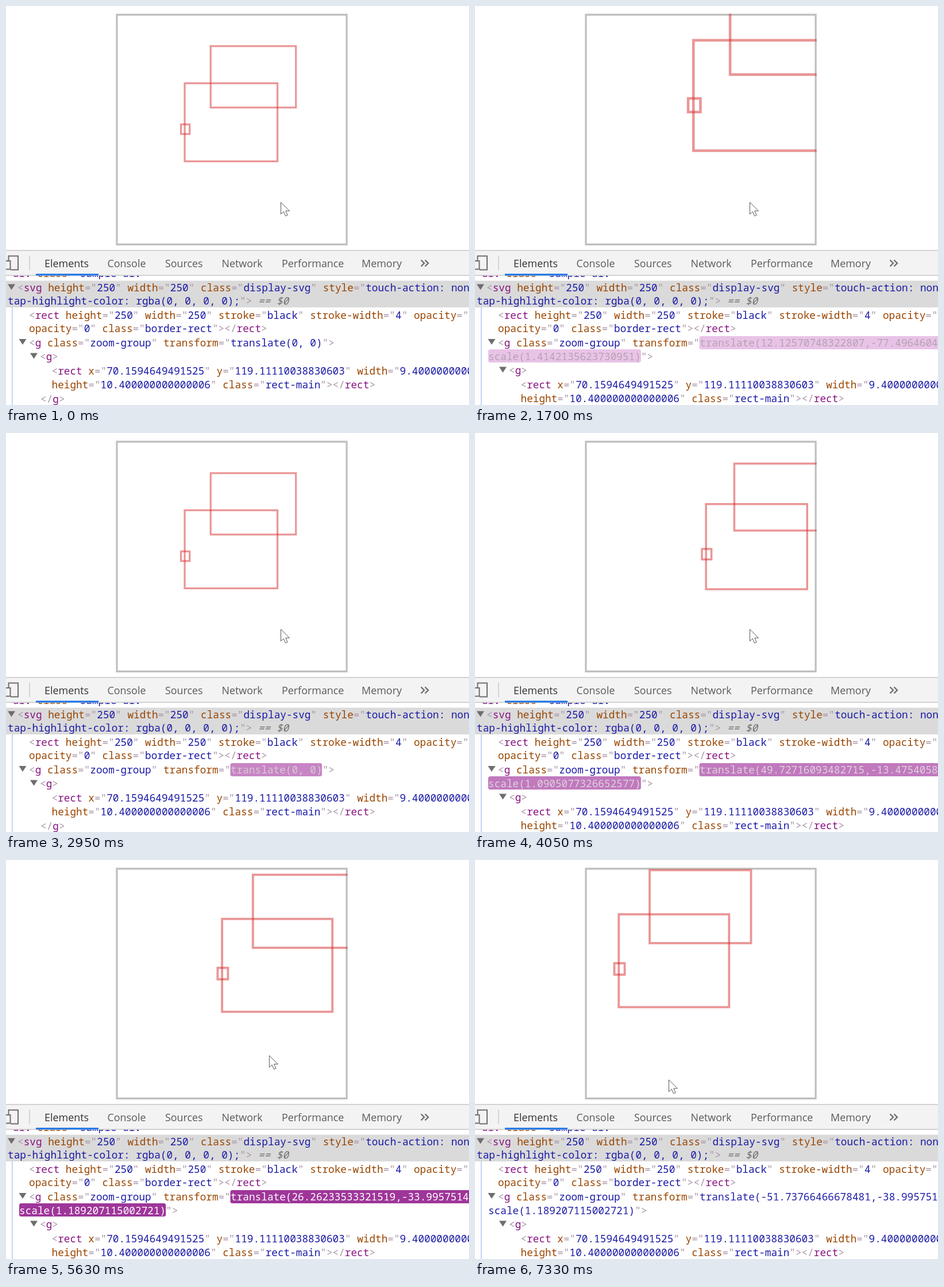
Write an HTML page that moves like this. It is 806x695 px and loops after 7.47 s.

```html
<!DOCTYPE html>
<html lang="en">
<head>
<meta charset="utf-8">
<title>Zoom and pan inspector</title>
<style>
  html, body { margin: 0; width: 100%; height: 100%; overflow: hidden; background: #fff; }
  #stage { display: block; }
  text { white-space: pre; }
  .code { font: 17.73px "Noto Sans Mono", monospace; fill: #a894a6; }
  .tag { fill: #881280; }
  .attr { fill: #994500; }
  .value { fill: #1a1aa6; }
  .note { fill: #6e6e6e; font-style: italic; }
  .tab { font: 17.9px "Open Sans", sans-serif; fill: #5a5a5a; }
  .arrow { fill: #6e6e6e; }
  .shapes rect { fill: none; stroke: rgb(214, 47, 47); stroke-width: 2; opacity: .5; }
</style>
</head>
<body>
<svg id="stage" width="806" height="695" viewBox="0 0 806 695">
  <svg x="191.4" y="13.6" width="403.3" height="403.3" viewBox="0 0 250 250">
    <rect width="250" height="250" fill="none" stroke="#000" stroke-width="4" opacity=".25"/>
    <g id="zoom" class="shapes">
      <rect x="70.16" y="119.4" width="9.4" height="10.4"/>
      <rect x="74.2" y="75" width="100.1" height="84.3"/>
      <rect x="102.2" y="34.9" width="92" height="66.3"/>
    </g>
  </svg>

  <rect y="478.5" width="806" height="46.5" fill="#dadada"/>
  <rect x="10" y="525" width="1.6" height="170" fill="#b4cdf6"/>
  <g id="markup"></g>
  <g id="boxes">
    <rect x="390.5" y="575" height="23" rx="3.5"/>
    <rect x="23" y="598" width="0" height="23" rx="3.5"/>
  </g>
  <g id="values" class="code">
    <text x="391.1" y="593"></text>
    <text x="23" y="616.5"></text>
  </g>
  <g id="closing"></g>
  <g id="children"></g>

  <rect y="425" width="806" height="45" fill="#f3f3f3"/>
  <path d="M0 425.8H806M0 469.3H806" stroke="#c8c8c8" stroke-width="1.5"/>
  <path d="M41 435V460" stroke="#ccc" stroke-width="1.6"/>
  <rect x="52" y="466.4" width="109" height="3" fill="#1a73e8"/>
  <g fill="#f3f3f3" stroke="#6e6e6e" stroke-width="2">
    <path d="M4.5 443V435.5H21V459.5H8"/>
    <rect x="-6" y="444" width="13.5" height="14.5"/>
    <path d="M722.5 442.5l5.5 5.5-5.5 5.5M729.5 442.5l5.5 5.5-5.5 5.5" fill="none" stroke-width="2.4"/>
  </g>
  <g id="tabs"></g>

  <path id="cursor" d="M0 0V20.5L4.7 16.2 8 23.8 11.6 22.2 8.3 14.9H15Z"
        fill="#fff" stroke="#444" stroke-width=".9"/>
</svg>
<script>
const LOOP = 7470, FIRST_TICK = 438, TICK = 156.4, FADE = 1400, CHAR = 10.638;
const $ = id => document.getElementById(id);

// Translate and scale after each wheel notch.
const LEVELS = [
  [0, 0, 1],
  [49.72716093482715, -13.47540582716394, 1.0905077326652577],
  [38.26233533321519, -32.99575148273615, 1.189207115002721],
  [25.75977920418365, -54.28290361748253, 1.296839554651009],
  [12.12570748322807, -77.49646042815937, 1.4142135623730951]
];
// [time, level]
const NOTCHES = [
  [-FADE, 0], [438, 1], [545, 3], [1100, 4],
  [2300, 3], [2460, 2], [2610, 1], [2729, 0],
  [3870, 1], [4227, 2]
];
const PAN = { start: 5480, end: 5993, dx: -90, dy: -6 };

const escape = s => s.replace(/&/g, '&amp;').replace(/</g, '&lt;');
const span = (cls, s) => `<tspan class="${cls}">${escape(s)}</tspan>`;

// Colours one line of markup; quoted tells whether it begins inside a value.
function highlight(src, quoted = false) {
  let afterOpen = false;
  return src.match(/"|<\/?|[=>]|\/|\s+|[^"<>=\/\s]+/g).map(token => {
    if (token === '"') { quoted = !quoted; return token; }
    if (quoted) return span('value', token);
    if (token[0] === '<') { afterOpen = true; return escape(token); }
    if (!/\w/.test(token)) return token;
    const cls = afterOpen ? 'tag' : 'attr';
    afterOpen = false;
    return span(cls, token);
  }).join('');
}
const line = (x, y, src, quoted) =>
  `<text class="code" x="${x}" y="${y}">${highlight(src, quoted)}</text>`;
const arrow = (x, y) => `<path class="arrow" d="M${x} ${y}h13l-6.5 10z"/>`;

$('markup').innerHTML =
  line(1, 471.8, '<div class="sample-div">') +
  arrow(3, 484.5) +
  line(20, 497, '<svg height="250" width="250" class="display-svg" style="touch-action: none;') +
  line(3, 520, 'tap-highlight-color: rgba(0, 0, 0, 0);">', true) +
  `<text class="code note" x="439" y="520">== $0</text>` +
  line(40, 544.5, '<rect height="250" width="250" stroke="black" stroke-width="4" opacity="0.25"') +
  line(40, 568, 'opacity="0" class="border-rect"></rect>') +
  arrow(22.5, 580) +
  line(40, 593, '<g class="zoom-group" transform="');

$('children').innerHTML =
  arrow(42, 604.5) +
  line(59, 617, '<g>') +
  line(79.5, 642, '<rect x="70.1594649491525" y="119.11110038830603" width="9.400000000000006"') +
  line(79.5, 666, 'height="10.400000000000006" class="rect-main"></rect>') +
  line(60, 691, '</g>');

$('tabs').innerHTML = [
  ['Elements', 67], ['Console', 176.5], ['Sources', 277],
  ['Network', 375.5], ['Performance', 480], ['Memory', 619]
].map(([name, x], i) =>
  `<text class="tab" x="${x}" y="454.5"${i ? '' : ' style="fill:#333"'}>${name}</text>`).join('');

// The flash is seeked by hand, so it stays paused.
function flash(el, colours) {
  const easing = 'cubic-bezier(0, 0, .2, 1)';
  const frames = colours.map((fill, i) => ({ fill, offset: [0, .8, 1][i], easing }));
  const anim = el.animate(frames, { duration: FADE, fill: 'both' });
  anim.pause();
  return anim;
}
const flashes = [
  flash($('boxes'), ['rgb(158,54,153)', 'rgb(245,219,244)', 'rgba(245,219,244,0)']),
  flash($('values'), ['rgb(255,255,255)', 'rgb(168,148,166)', 'rgb(26,26,166)'])
];

const progress = (t, a, b) => Math.min(1, Math.max(0, (t - a) / (b - a)));
const smooth = u => u * u * (3 - 2 * u);

function stateAt(t) {
  let [changed, level] = NOTCHES.filter(n => n[0] <= t).pop();
  const pan = smooth(progress(t, PAN.start, PAN.end));
  const leave = smooth(progress(t, 6470, 6860));
  if (pan > 0) changed = Math.min(t, PAN.end);
  const [x, y, scale] = LEVELS[level];
  return {
    x: x + Math.round(PAN.dx * pan),
    y: y + Math.round(PAN.dy * pan),
    scale,
    age: Math.min(FADE, t - changed),
    cursor: [478.5 - 147 * pan + 6 * leave, 342 - 10 * pan + 51 * leave]
  };
}

function draw(t) {
  const { x, y, scale, age, cursor } = stateAt(t);
  const wrapped = scale !== 1;
  const first = wrapped ? `translate(${x},${y})` : 'translate(0, 0)';
  const second = wrapped ? `scale(${scale})` : '';
  const [box1, box2] = $('boxes').children;
  const [text1, text2] = $('values').children;

  $('zoom').setAttribute('transform', `translate(${x},${y}) scale(${scale})`);
  $('cursor').setAttribute('transform', `translate(${cursor})`);
  $('children').setAttribute('transform', `translate(0,${wrapped ? 24 : 0})`);
  text1.textContent = first;
  text2.textContent = second;
  box1.setAttribute('width', first.length * CHAR);
  box2.setAttribute('width', second.length * CHAR);
  $('closing').innerHTML = wrapped
    ? line(23 + second.length * CHAR, 616.5, '">', true)
    : line(391.1 + first.length * CHAR, 593, '">', true);
  flashes.forEach(f => { f.currentTime = age; });
}

const began = performance.now();
let shown = null;
function frame() {
  const t = (performance.now() - began) % LOOP;
  const k = Math.floor((t - FIRST_TICK) / TICK);
  const tick = k < 0 ? 0 : FIRST_TICK + k * TICK;
  if (tick !== shown) draw(shown = tick);
  requestAnimationFrame(frame);
}
frame();
</script>
</body>
</html>
```
